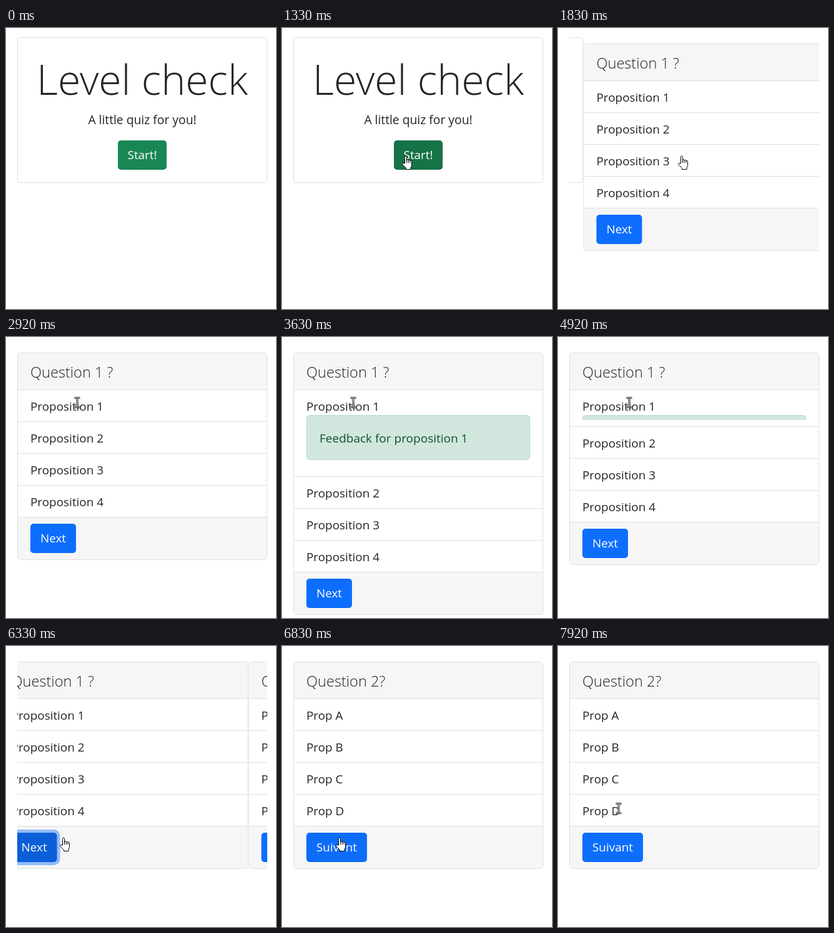
An HTML page for the animation above (8 s loop, 432 px wide and 450 px high).

```html
<!DOCTYPE html>
<html lang="en">
<head>
<meta charset="utf-8">
<title>Level check</title>
<style>
* { box-sizing: border-box; }
html, body { margin: 0; width: 100%; height: 100%; overflow: hidden; background: #fff; }
body { position: relative; font: 18.9px/30px "Open Sans", "Noto Sans", sans-serif; color: #212529; white-space: nowrap; }

/* Carousel */
.view { position: absolute; left: 18px; top: 0; width: 400px; height: 450px; overflow: hidden; }
.track { position: relative; width: 1200px; height: 450px; animation: slide 8s infinite; }
.card { position: absolute; top: 25px; width: 400px; border: 1px solid #dfdfdf; border-radius: 5px; overflow: hidden; background: #fff; }
.intro { left: 0; top: 15px; height: 233px; text-align: center; }
.one { left: 400px; }
.two { left: 800px; }

/* Card parts */
.intro > * { position: absolute; margin: 0; }
h1 { left: 0; width: 100%; top: 20px; font-size: 66.2px; line-height: 90px; font-weight: 300; }
.intro p { left: 0; width: 100%; top: 116px; font-size: 19.3px; }
h2 { margin: 0; height: 59px; padding-left: 20px; font-size: 23.6px; line-height: 60px; font-weight: 300; background: #f6f6f6; border-bottom: 1px solid #dfdfdf; }
.row { padding: 11px 20px 9px; border-bottom: 1px solid #dfdfdf; }
.foot { height: 67px; padding: 10px 20px; background: #f6f6f6; }
.btn { width: 73px; height: 47px; line-height: 47px; border-radius: 5px; text-align: center; color: #fff; background: #0d6efd; }
.start { left: 160px; top: 164px; width: 78px; background: #198754; animation: start 8s infinite; }
.next { animation: next 8s infinite; }
.last { width: 97px; animation: last 8s infinite; }
.fold { position: relative; top: -1px; height: 0; overflow: hidden; animation: fold 8s infinite; }
.alert { height: 72px; padding: 21px 20px; font-size: 19px; color: #0f5132; background: #d1e7dd; border: 1px solid #badbcc; border-radius: 5px; }

/* Pointer */
.pointer { position: absolute; left: 0; top: 0; width: 1px; height: 1px; overflow: visible; animation: move 8s infinite; }
.pointer g { visibility: hidden; animation: 8s step-end infinite; }
.pointer .arrow { animation-name: arrow; }
.pointer .hand { animation-name: hand; }
.pointer .beam { animation-name: beam; }

@keyframes slide {
  0%, 16.6375% { transform: none; animation-timing-function: ease-in-out; }
  24.1375%, 77.6875% { transform: translateX(-400px); animation-timing-function: ease-in-out; }
  85.1875%, 100% { transform: translateX(-800px); }
}
@keyframes fold {
  0%, 42.125% { height: 0; animation-timing-function: ease; }
  46.5%, 58.675% { height: 92px; animation-timing-function: ease; }
  63.05%, 100% { height: 0; }
}
@keyframes start {
  0%, 8.8% { background: #198754; }
  10.7%, 16.7% { background: #157347; box-shadow: 0 0 0 5px rgba(60, 153, 110, 0); }
  18.5%, 100% { background: #157347; box-shadow: 0 0 0 5px rgba(60, 153, 110, .5); }
}
@keyframes next {
  0%, 72.8% { background: #0d6efd; }
  74.7%, 76.7% { background: #0b5ed7; box-shadow: 0 0 0 5px rgba(49, 132, 253, 0); }
  78.5%, 100% { background: #0b5ed7; box-shadow: 0 0 0 5px rgba(49, 132, 253, .5); }
}
@keyframes last {
  0%, 85.2%, 93.3%, 100% { background: #0d6efd; }
  87.1%, 91.4% { background: #0b5ed7; }
}
@keyframes move {
  0%, 1.6% { transform: translate(-20px, 66px); animation-timing-function: linear; }
  5% { transform: translate(92px, 92px); animation-timing-function: linear; }
  8% { transform: translate(172px, 172px); animation-timing-function: ease-out; }
  11%, 26% { transform: translate(198px, 206px); animation-timing-function: ease-in-out; }
  36%, 66.6% { transform: translate(114px, 105px); animation-timing-function: ease-in-out; }
  74%, 89.2% { transform: translate(92px, 308px); animation-timing-function: ease-in-out; }
  97%, 100% { transform: translate(97px, 260px); }
}
@keyframes arrow {
  0%, 7%, 26.2%, 67.6%, 91.4% { visibility: visible; }
  3.8%, 8.8%, 34%, 72.8%, 95%, 100% { visibility: hidden; }
}
@keyframes hand {
  0%, 26.2%, 91.4%, 100% { visibility: hidden; }
  8.8%, 72.8% { visibility: visible; }
}
@keyframes beam {
  0%, 7%, 67.6% { visibility: hidden; }
  3.8%, 34%, 95%, 100% { visibility: visible; }
}
</style>
</head>
<body>
<div class="view">
  <div class="track">
    <section class="card intro">
      <h1>Level check</h1>
      <p>A little quiz for you!</p>
      <div class="btn start">Start!</div>
    </section>
    <section class="card one">
      <h2>Question 1 ?</h2>
      <div class="row">Proposition 1
        <div class="fold"><div class="alert">Feedback for proposition 1</div></div>
      </div>
      <div class="row">Proposition 2</div>
      <div class="row">Proposition 3</div>
      <div class="row">Proposition 4</div>
      <div class="foot"><div class="btn next">Next</div></div>
    </section>
    <section class="card two">
      <h2>Question 2?</h2>
      <div class="row">Prop A</div>
      <div class="row">Prop B</div>
      <div class="row">Prop C</div>
      <div class="row">Prop D</div>
      <div class="foot"><div class="btn last">Suivant</div></div>
    </section>
  </div>
</div>
<svg class="pointer" fill="#fff" stroke="#000" stroke-linejoin="round">
  <g class="arrow"><path d="M0 0V17l4-3.8 2.6 6 2.6-1.1-2.6-5.9H12z"/></g>
  <g class="hand" transform="translate(-7 -2)">
    <path d="M5.5 13V2.5a1.5 1.5 0 0 1 3 0V8a1.4 1.4 0 0 1 2.8.4a1.4 1.4 0 0 1 2.7.6a1.3 1.3 0 0 1 2.5.7V15.5c0 2-1 3-1.5 4.5V22.5H7.5V20.5L2 14.8c-1.2-1.6.6-3.2 2-2.2z"/>
    <path d="M8.5 8V12M11.3 8.5V12M14 9.2V12" fill="none"/>
  </g>
  <g class="beam" fill="none">
    <path id="bar" d="M-4.5-7.5H-1L0-6.5L1-7.5H4.5M0-6.5V6.5M-4.5 7.5H-1L0 6.5L1 7.5H4.5" stroke="#222" stroke-width="3"/>
    <use href="#bar" style="display:none"/>
    <path d="M-4.5-7.5H-1L0-6.5L1-7.5H4.5M0-6.5V6.5M-4.5 7.5H-1L0 6.5L1 7.5H4.5" stroke="#fff"/>
  </g>
</svg>
</body>
</html>
```
